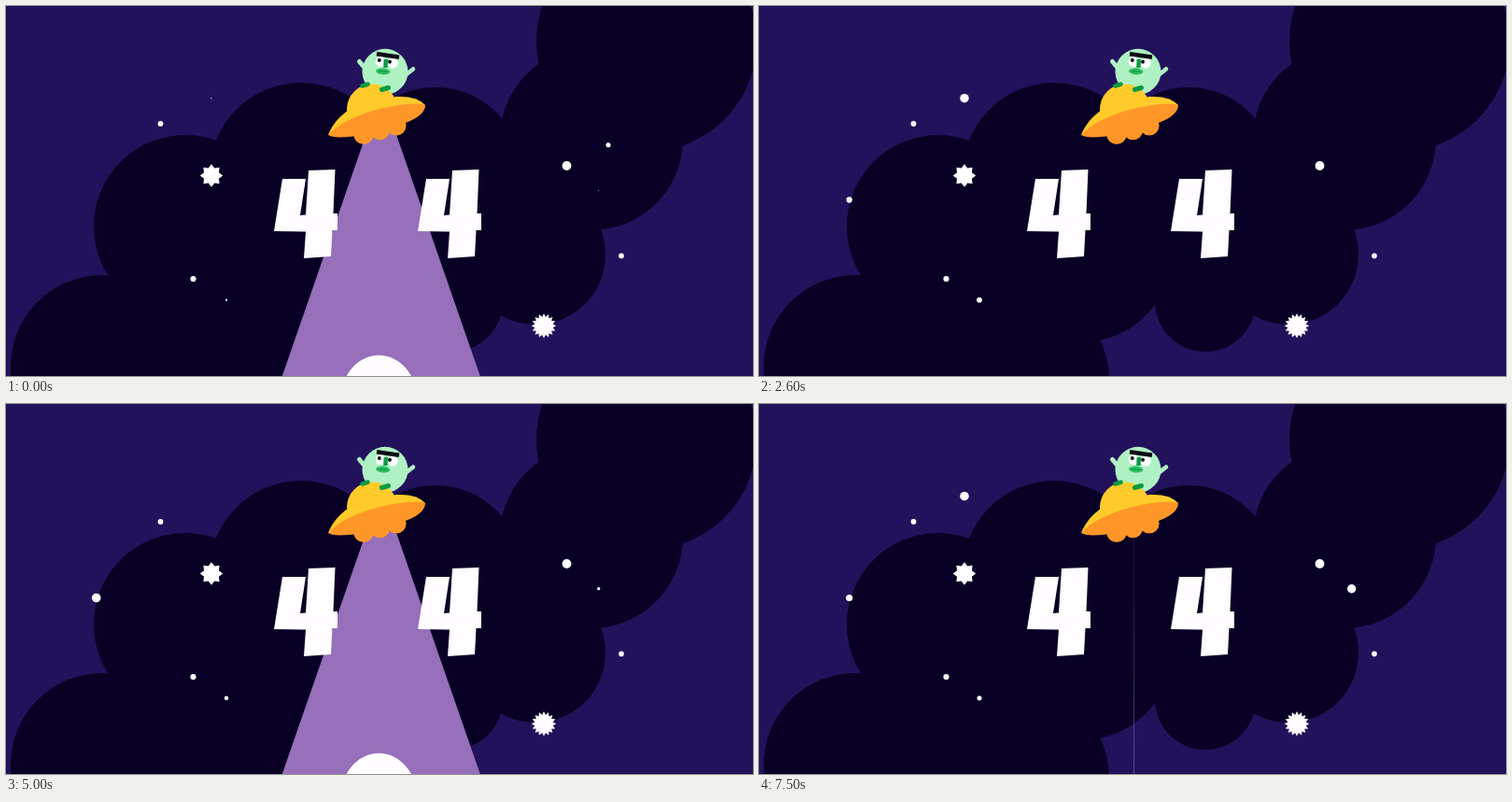
An HTML page with a canvas that plays this animation: 800 px wide and 396 px high, repeating every 7600 ms.

```html
<!DOCTYPE html>
<html lang="en">
<head>
<meta charset="utf-8">
<title>404</title>
<style>
  html, body { margin: 0; width: 100%; height: 100%; overflow: hidden; background: #22125c; }
  canvas { display: block; width: 800px; height: 396px; }
</style>
</head>
<body>
<canvas id="stage" width="800" height="396"></canvas>
<script>
const ctx = document.getElementById('stage').getContext('2d');
const LOOP = 7600, STEP = 100, CYCLE = 50.4;
const NIGHT = '#22125c', CLOUD = '#090025', BEAM = '#976fba', WHITE = '#fffdff';
const YELLOW = '#ffcb2b', ORANGE = '#ff9728';
const SKIN = '#aff1c3', LEAF = '#0c9a41', LIP = '#2fbd63', INK = '#0a0a12';

const clamp = v => Math.max(0, Math.min(1, v));
const lerp = (a, b, k) => a + (b - a) * k;
const easeOut = k => 1 - (1 - k) ** 3;

function poly(points, color, dx = 0) {
  ctx.fillStyle = color;
  ctx.beginPath();
  points.forEach(([x, y]) => ctx.lineTo(x + dx, y));
  ctx.fill();
}

function shape(path, color) {
  ctx.fillStyle = color;
  ctx.fill(new Path2D(path));
}

function oval(x, y, rx, ry, color, turn = 0) {
  ctx.fillStyle = color;
  ctx.beginPath();
  ctx.ellipse(x, y, rx, ry, turn, 0, Math.PI * 2);
  ctx.fill();
}

const dot = (x, y, r, color) => oval(x, y, r, r, color);

function stroke(x1, y1, x2, y2, width, color, cap = 'round') {
  ctx.strokeStyle = color;
  ctx.lineWidth = width;
  ctx.lineCap = cap;
  ctx.beginPath();
  ctx.moveTo(x1, y1);
  ctx.lineTo(x2, y2);
  ctx.stroke();
}

function burst(x, y, spikes, outer, inner) {
  const points = Array.from({ length: spikes * 2 }, (_, i) => {
    const a = i * Math.PI / spikes, r = i % 2 ? inner : outer;
    return [x + r * Math.cos(a), y + r * Math.sin(a)];
  });
  poly(points, WHITE);
}

// Cloud outline, clockwise: centre and, if unusual, radius.
const puffs = [
  [103, 386], [192, 236], [316, 180], [460, 180, 93], [686, 38, 118],
  [627, 142], [567, 266, 75], [478, 316, 54], [345, 262], [277, 400]
];

function drawCloud() {
  poly(puffs.filter(([, y]) => y > 100), CLOUD);
  puffs.forEach(([x, y, r = 98]) => dot(x, y, r, CLOUD));
}

// Twinkling stars add a period and the moment they vanish, in steps.
const stars = [
  { x: 165.5, y: 126, r: 2.9 },
  { x: 200.5, y: 292, r: 3.1 },
  { x: 600.5, y: 171, r: 4.9 },
  { x: 659, y: 267.4, r: 2.8 },
  { x: 220, y: 98.7, r: 4.8, period: 52, gone: 46 },
  { x: 96.7, y: 207.5, r: 4.8, period: 30, gone: 1 },
  { x: 236, y: 314.7, r: 4.8, period: 50, gone: 8 },
  { x: 645, y: 148.7, r: 4.8, period: 8.1, gone: 22.2 },
  { x: 634.7, y: 197.7, r: 4.8, period: 20, gone: 22 }
];

function drawStars(n) {
  for (const { x, y, r, period, gone } of stars) {
    const size = period ? Math.sin(Math.PI * (n - gone) / period) ** 2 : 1;
    dot(x, y, r * size, WHITE);
  }
  burst(220, 181.5, 8, 12.2, 8.6);
  burst(576, 342.3, 16, 13.3, 9.8);
}

function drawBeam(p) {
  const half = Math.min(212, Math.max(0, 10.85 * Math.max(20.65 - p, p - 22.2))) / 2;
  if (half) poly([[401.8, 91], [401.8 - half, 396], [401.8 + half, 396]], BEAM);
}

function drawZero(p) {
  let y, s = 1;
  if (p < 20.8) {
    // Leaps up the beam, then shrinks into the ship.
    const e = easeOut(clamp((p - 0.6) / 4.4));
    const size = 0.045 * (20.8 - p);
    s = lerp(1, size, e);
    y = lerp(422.5, 134 + 96.7 * size, e);
  } else {
    y = lerp(495.5, 422.5, easeOut(clamp((p - 22.2) / 19.4)));
  }
  ctx.fillStyle = WHITE;
  ctx.beginPath();
  ctx.ellipse(399.3, y, 41.3 * s, 48.7 * s, 0, 0, Math.PI * 2);
  ctx.closePath();
  ctx.ellipse(399, y + 2 * s, 14.2 * s, 20.5 * s, 0, 0, Math.PI * 2);
  ctx.fill('evenodd');
}

const four = [
  [296, 185], [321, 185], [315, 224], [321, 223.5], [324, 176], [352.5, 175], [350.5, 222],
  [355, 222], [355, 240], [349.5, 240], [348, 268], [319, 270], [321, 241.5], [287, 241]
];

function drawShip() {
  dot(392, 110.5, 27, YELLOW);
  shape('M345 138 Q352 120 372 108 L418 97 Q440 96 449 106 L400 125 Z', YELLOW);
  for (let i = 0; i < 3; i++) dot(383 + 17.5 * i, 137.5 - 4.8 * i, 10.6, ORANGE);
  shape('M345 138 Q360 121 400 110 Q436 102 449 106 Q449 117 428 125 L372 139.5 Q350 142 345 138 Z', ORANGE);
}

function drawAlien() {
  stroke(378.5, 59.5, 384, 66, 5, SKIN);
  stroke(429, 73, 436, 67.5, 4.5, SKIN);
  dot(406, 70.3, 24.5, SKIN);
  dot(401.5, 59.5, 5.6, '#fff');
  dot(414.2, 61, 5.6, '#fff');
  dot(399.8, 58, 2, INK);
  dot(411, 59.8, 2, INK);
  stroke(397, 51.3, 421, 54.7, 4.4, INK, 'butt');
  stroke(406.8, 57, 406.4, 66, 4.4, LEAF, 'butt');
  oval(403.7, 70, 7.7, 3.4, LIP, 0.06);
  stroke(399.5, 69.8, 408, 70.3, 1.2, LEAF);
}

function drawFeet() {
  stroke(381.5, 85.5, 387.5, 83.7, 4.6, LEAF);
  stroke(402.5, 89.5, 409.5, 87.5, 5, LEAF);
}

function draw(now) {
  // The scene rests for the first five steps of each loop.
  const n = Math.max(0, Math.floor((now % LOOP) / STEP) - 4);
  const p = n % CYCLE;
  ctx.fillStyle = NIGHT;
  ctx.fillRect(0, 0, 800, 396);
  drawCloud();
  drawStars(n);
  drawBeam(p);
  drawZero(p);
  poly(four, WHITE);
  poly(four, WHITE, 154);
  drawAlien();
  drawShip();
  drawFeet();
}

const start = performance.now();
function tick() {
  draw(performance.now() - start);
  requestAnimationFrame(tick);
}
tick();
</script>
</body>
</html>
```
